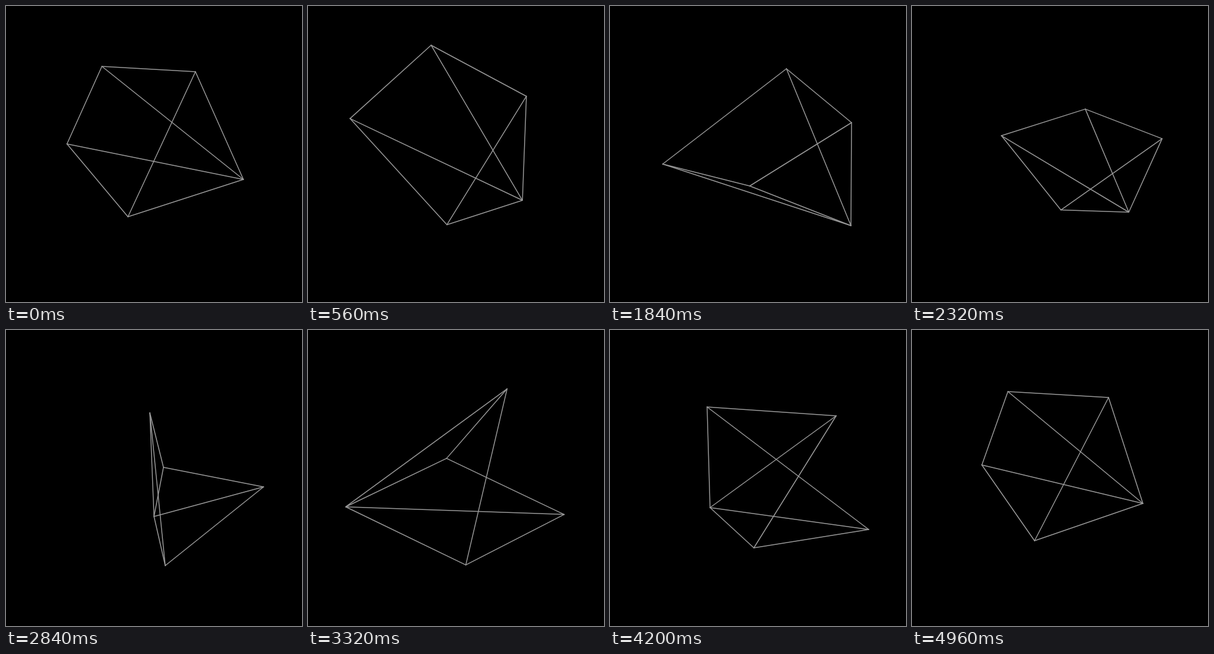
Write an HTML page with a canvas that moves like this. It is 500x500 px and loops after 5 s.

```html
<!DOCTYPE html>
<html lang="en">
<head>
<meta charset="utf-8">
<title>Drifting wireframe</title>
<style>
  html, body { margin: 0; width: 100%; height: 100%; overflow: hidden; background: #000; }
  canvas { display: block; }
</style>
</head>
<body>
<canvas id="stage" width="500" height="500"></canvas>
<script>
const LOOP = 5000, STEP = 40;
const SHARP = 0.4; // reversals steeper than this (px/ms) keep a hard corner

// Key poses: time, then x, y of the four ring corners and the apex.
const poses = [
  [0,    162, 102, 320, 111, 206, 356, 103, 233, 401, 293],
  [1080, 247, 62,  397, 179, 246, 359, 63, 192,  358, 352],
  [1840, 298, 106, 408, 197, 236, 304, 89, 267,  407, 371],
  [2840, 266, 232, 435, 265, 269, 398, 243, 140, 250, 315],
  [3360, 231, 214, 433, 315, 266, 396, 343, 98,  48, 298],
  [3800, 194, 167, 443, 346, 257, 380, 402, 106, 104, 297],
  [4200, 164, 130, 437, 337, 243, 368, 382, 145, 169, 300],
  [4960, 162, 104, 332, 114, 207, 356, 118, 228, 390, 293]
];
poses.push([LOOP, ...poses[0].slice(1)]);

const RING = 4, APEX = 4, LAST = poses.length - 1;
const span = i => poses[i + 1][0] - poses[i][0];
const secant = (c, i) => (poses[i + 1][c] - poses[i][c]) / span(i);

// Slope of coordinate c at pose k, as seen from the segment after pose i.
function slope(c, k, i) {
  if (k === 0) return 2 * secant(c, 0) - slope(c, 1, 0);
  if (k === LAST) return 2 * secant(c, i) - slope(c, i, i);
  const before = secant(c, k - 1), after = secant(c, k);
  if (before * after < 0 && Math.abs(after - before) > SHARP) return secant(c, i);
  const a = span(k - 1), b = span(k);
  return (b * before + a * after) / (a + b);
}

// Cubic Hermite between the two poses around t.
function valueAt(c, t) {
  const i = poses.findIndex(p => p[0] > t) - 1;
  const h = span(i), u = (t - poses[i][0]) / h, w = 1 - u;
  return w * w * (1 + 2 * u) * poses[i][c] + u * u * (3 - 2 * u) * poses[i + 1][c]
    + h * u * w * (w * slope(c, i, i) - u * slope(c, i + 1, i));
}

const ctx = document.getElementById('stage').getContext('2d');
ctx.strokeStyle = '#9a9a9a';
ctx.lineWidth = 1.5;
ctx.lineCap = 'round';

function line(from, to) {
  ctx.beginPath();
  ctx.moveTo(...from);
  ctx.lineTo(...to);
  ctx.stroke();
}

function draw(t) {
  const point = n => [valueAt(2 * n + 1, t), valueAt(2 * n + 2, t)];
  ctx.fillStyle = '#000';
  ctx.fillRect(0, 0, 500, 500);
  for (let n = 0; n < RING; n++) {
    line(point(n), point((n + 1) % RING));
    line(point(n), point(APEX));
  }
}

const start = performance.now();
function tick() {
  const t = (performance.now() - start) % LOOP;
  draw(Math.floor(t / STEP) * STEP);
  requestAnimationFrame(tick);
}
tick();
</script>
</body>
</html>
```
